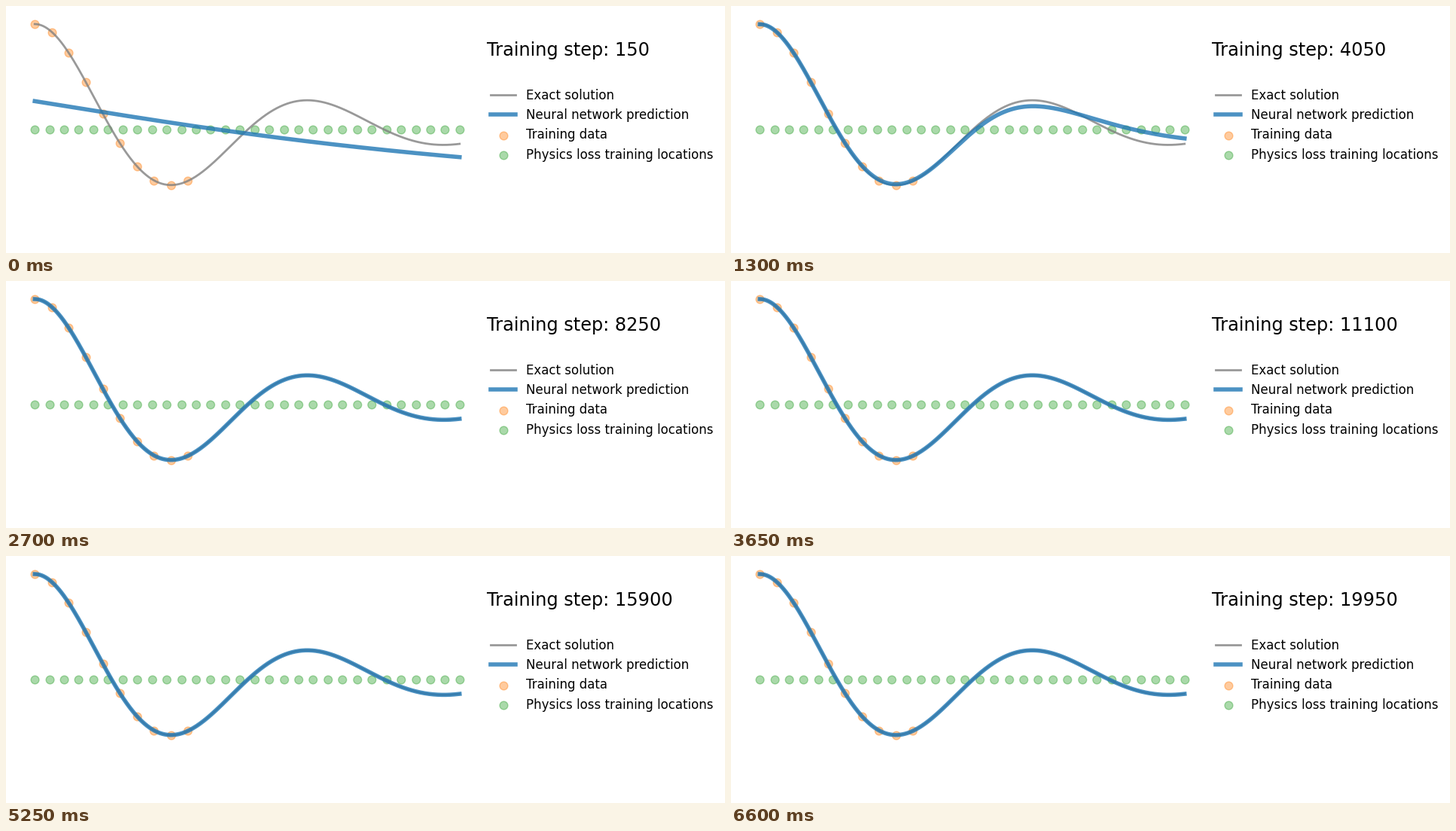
A matplotlib script for the animation above (6650 ms loop, 954 by 328 pixels).

```python
import numpy as np
import matplotlib.pyplot as plt
from matplotlib.animation import FuncAnimation

W, H, DPI = 954, 328, 100
FRAMES, INTERVAL = 133, 50
STEPS_PER_FRAME = 150
TRAINED_FRAMES = 70  # the fit has settled by then

# Damped harmonic oscillator: y'' + MU y' + K y = 0
DAMP, OMEGA0 = 2, 10
MU, K = 2 * DAMP, OMEGA0 ** 2


def oscillator(t):
    w = np.sqrt(OMEGA0 ** 2 - DAMP ** 2)
    phi = np.arctan(-DAMP / w)
    return np.exp(-DAMP * t) * np.cos(phi + w * t) / np.cos(phi)


x = np.linspace(0, 1, 500)
y = oscillator(x)
x_data, y_data = x[0:200:20], y[0:200:20]
x_phys = np.linspace(0, 1, 30)


class Net:
    """Tanh network that carries value, first and second derivative."""

    def __init__(self, sizes, seed):
        rng = np.random.RandomState(seed)
        shapes = []
        values = []
        for n_in, n_out in zip(sizes[:-1], sizes[1:]):
            bound = 1 / np.sqrt(n_in)

            def draw(count):
                raw = rng.randint(0, 2 ** 32, count, dtype=np.uint32)
                return ((raw & 0xFFFFFF) / 2 ** 24 * 2 - 1) * bound

            weight = draw(n_in * n_out).reshape(n_out, n_in).T
            values += [weight.ravel(), draw(n_out)]
            shapes += [(n_in, n_out), (n_out,)]
        self.theta = np.concatenate(values)
        self.grad = np.zeros_like(self.theta)
        self.m = np.zeros_like(self.theta)
        self.v = np.zeros_like(self.theta)
        self.params = self.views(self.theta, shapes)
        self.grads = self.views(self.grad, shapes)
        self.t = 0

    @staticmethod
    def views(flat, shapes):
        parts, pos = [], 0
        for shape in shapes:
            size = int(np.prod(shape))
            parts.append(flat[pos:pos + size].reshape(shape))
            pos += size
        return list(zip(parts[0::2], parts[1::2]))

    def predict(self, t):
        a = t[:, None]
        for w, b in self.params[:-1]:
            a = np.tanh(a @ w + b)
        w, b = self.params[-1]
        return (a @ w + b)[:, 0]

    def forward(self, a):
        self.tape = []
        for w, b in self.params[:-1]:
            z = a @ w
            h = np.tanh(z[0] + b)
            s = 1 - h * h
            self.tape.append((a, z, h, s))
            a = np.empty_like(z)
            a[0] = h
            a[1] = s * z[1]
            a[2] = s * (z[2] - 2 * h * z[1] ** 2)
        self.last = a
        w, b = self.params[-1]
        out = a @ w
        out[0] += b
        return out[..., 0]

    def collect(self, layer, a, g):
        gw, gb = self.grads[layer]
        gw[:] = a.reshape(-1, a.shape[2]).T @ g.reshape(-1, g.shape[2])
        gb[:] = g[0].sum(0)

    def backward(self, g):
        g = g[..., None]
        self.collect(-1, self.last, g)
        for layer in range(len(self.tape) - 1, -1, -1):
            a, z, h, s = self.tape[layer]
            g = g @ self.params[layer + 1][0].T
            gz = np.empty_like(g)
            z1g2 = z[1] * g[2]
            gz[2] = s * g[2]
            gz[1] = s * (g[1] - 4 * h * z1g2)
            gz[0] = s * (g[0] - 2 * h * (g[1] * z[1] + g[2] * z[2])
                         - 2 * z1g2 * z[1] * (1 - 3 * h * h))
            self.collect(layer, a, gz)
            g = gz

    def adam(self, lr, b1=0.9, b2=0.999, eps=1e-8):
        self.t += 1
        self.m += (1 - b1) * (self.grad - self.m)
        self.v += (1 - b2) * (self.grad ** 2 - self.v)
        root = np.sqrt(self.v / (1 - b2 ** self.t)) + eps
        self.theta -= lr / (1 - b1 ** self.t) * self.m / root


def train():
    """Fit data and equation together; keep the curve of each frame."""
    net = Net([1, 32, 32, 32, 1], seed=123)
    n = len(x_data)
    points = np.concatenate([x_data, x_phys])[:, None]
    inputs = np.stack([points, np.ones_like(points), np.zeros_like(points)])
    g = np.zeros(inputs.shape[:2])
    curves = []
    for _ in range(TRAINED_FRAMES):
        for _ in range(STEPS_PER_FRAME):
            out = net.forward(inputs)
            g[0, :n] = 2 / n * (out[0, :n] - y_data)
            f, d1, d2 = out[:, n:]
            r = 2e-4 / len(x_phys) * (d2 + MU * d1 + K * f)
            g[0, n:], g[1, n:], g[2, n:] = K * r, MU * r, r
            net.backward(g)
            net.adam(1e-4)
        curves.append(net.predict(x))
    return curves


curves = train()

# The tiny surplus keeps the pixel size from rounding down
fig = plt.figure(figsize=((W + 1e-6) / DPI, (H + 1e-6) / DPI), dpi=DPI,
                 facecolor="white")
plt.rcParams["font.family"] = "DejaVu Sans"
ax = fig.add_axes([10 / W, 10 / H, 620 / W, 308 / H])
ax.set_xlim(-0.05, 1.05)
ax.set_ylim(-1.1, 1.1)
ax.axis("off")

ax.plot(x, y, color="grey", lw=2, alpha=0.8, label="Exact solution")
fit, = ax.plot(x, curves[0], color="tab:blue", lw=4, alpha=0.8,
               label="Neural network prediction")
ax.scatter(x_data, y_data, s=60, color="tab:orange", alpha=0.4,
           label="Training data")
ax.scatter(x_phys, 0 * x_phys, s=60, color="tab:green", alpha=0.4,
           label="Physics loss training locations")
ax.legend(loc=(1.01, 0.34), frameon=False, fontsize="large", labelcolor="k")
title = ax.text(1.065, 0.7, "", fontsize="xx-large", color="k")


def update(i):
    fit.set_ydata(curves[min(i, TRAINED_FRAMES - 1)])
    title.set_text(f"Training step: {(i + 1) * STEPS_PER_FRAME}")
    return fit, title


anim = FuncAnimation(fig, update, frames=FRAMES, interval=INTERVAL,
                     init_func=lambda: update(0), repeat=True,
                     cache_frame_data=False)
plt.show()
```
